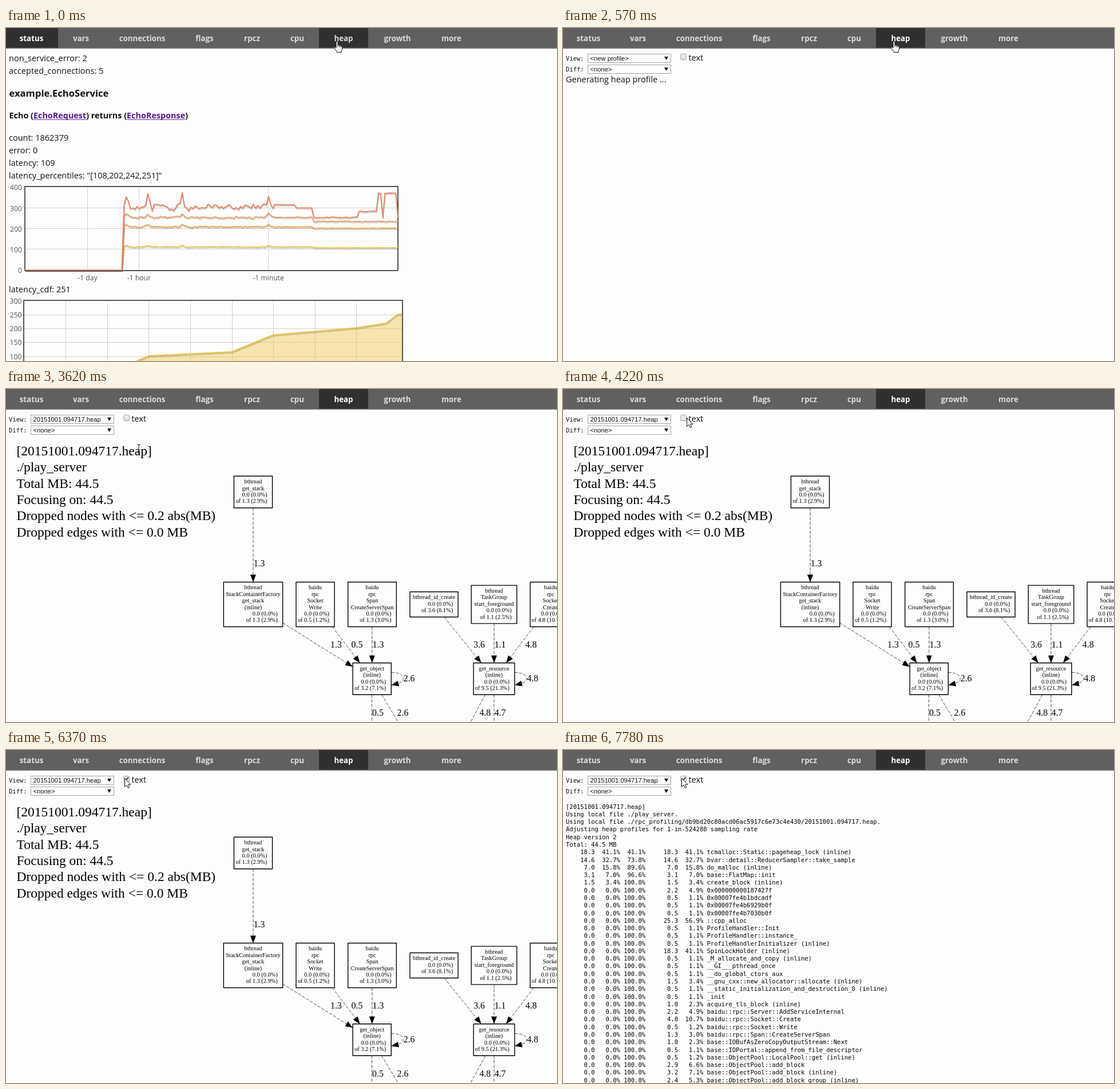
Animation of 963 by 582 pixels, one loop 8 s. Source, as an HTML page with a canvas:

```html
<!DOCTYPE html>
<html lang="en">
<head>
<meta charset="utf-8">
<title>Heap profile walkthrough</title>
<style>
html, body { margin: 0; width: 100%; height: 100%; overflow: hidden; background: #fdfdfd; }
canvas { display: block; }
</style>
</head>
<body>
<canvas id="stage" width="963" height="582"></canvas>
<script>
const W = 963, H = 582, LOOP = 8000;
const ctx = document.getElementById('stage').getContext('2d');

const SANS = '"Open Sans", "Noto Sans", sans-serif';
const FONT = {
  body: `14.5px ${SANS}`,
  nav: `bold 13.3px ${SANS}`,
  title: `bold 16.6px ${SANS}`,
  method: `bold 14.4px ${SANS}`,
  axis: `12.2px ${SANS}`,
  select: '11.2px "Liberation Sans", Arial, sans-serif',
  mono: '10.5px "DejaVu Sans Mono", monospace',
  legend: '23.5px "Liberation Serif", Times, serif',
  node: '10.35px "Liberation Serif", Times, serif',
  edge: '15.8px "Liberation Serif", Times, serif'
};

function text(str, x, y, font, color = '#111', align = 'left') {
  ctx.font = font;
  ctx.fillStyle = color;
  ctx.textAlign = align;
  ctx.fillText(str, x, y);
  return ctx.measureText(str).width;
}

function path(points, dx = 0, dy = 0) {
  ctx.beginPath();
  points.forEach(([x, y], i) => i ? ctx.lineTo(x + dx, y + dy) : ctx.moveTo(x + dx, y + dy));
}

function line(x1, y1, x2, y2, color, width = 1) {
  path([[x1, y1], [x2, y2]]);
  ctx.strokeStyle = color;
  ctx.lineWidth = width;
  ctx.stroke();
}

// Navigation bar

const TABS = [['status', 44.5], ['vars', 131], ['connections', 238], ['flags', 347], ['rpcz', 430],
  ['cpu', 509], ['heap', 590], ['growth', 684], ['more', 778.5]];

function drawNav(active) {
  ctx.fillStyle = '#606060';
  ctx.fillRect(0, 0, W, 35);
  ctx.fillStyle = '#303030';
  if (active === 'status') ctx.fillRect(0, 0, 91, 34.5);
  ctx.fillRect(547, 0, 86, 34.5);
  ctx.fillStyle = '#8e8e8e';
  ctx.fillRect(0, 35, W, 1);
  ctx.fillStyle = '#dadada';
  ctx.fillRect(0, 36, W, 1);
  for (const [name, x] of TABS) {
    text(name, x, 23, FONT.nav, name === active ? '#fff' : '#dcdcdc', 'center');
  }
}

// Status page

const FRAME = '#545454', GRID = '#d2d2d2';
const LAST = 173, FIRST = 46, MINUTE = 113;
const stepX = i => 33 + i * 652 / LAST;

function noise(i, seed) {
  const v = Math.sin(i * 12.99 + seed * 78.23) * 43758.55;
  return v - Math.floor(v) - 0.5;
}

// Each plateau is [first sample, height on stage].
const PLATEAUS = [[FIRST, 314], [117, 309], [126, 314.5], [134, 331], [155, 320.5], [164, 289],
  [166, 331], [167, 289], [LAST, 331]];
const SPIKES = [47, 57, 73, MINUTE];

const lastUpTo = (list, t) => list.filter(entry => entry[0] <= t).pop();
const spike = i => SPIKES.reduce((sum, s) => sum + 23 * Math.max(0, 1 - Math.abs(i - s) / 1.6), 0);
const peakAt = i => lastUpTo(PLATEAUS, i)[1] - spike(i) + noise(i, 5) * (i < 117 ? 13 : i < 134 ? 0 : 1.5);

const lowerLine = (early, late, amp) => i =>
  (i < 134 ? early : late) - spike(i) * amp * 0.32 + noise(i, amp) * amp * (i < 117 ? 4 : 1.5);

const SERIES = [
  ['#edc95c', lowerLine(382.5, 384, 0.3)],
  ['#eda55a', lowerLine(347.5, 350, 0.6)],
  ['#eda066', lowerLine(331, 338, 1)],
  ['#ec8765', peakAt]
];

function strokeSeries(points, color) {
  ctx.lineJoin = 'round';
  ctx.lineWidth = 2;
  path(points, 0.7, 2);
  ctx.strokeStyle = 'rgba(0,0,0,.17)';
  ctx.stroke();
  path(points);
  ctx.strokeStyle = color;
  ctx.stroke();
}

function chartFrame(x, y, w, h) {
  ctx.strokeStyle = FRAME;
  ctx.lineWidth = 2;
  ctx.strokeRect(x, y, w, h);
}

function drawLatency() {
  for (let k = 1; k < 4; k++) line(34, 278.5 + k * 36, 685, 278.5 + k * 36, GRID);
  [['-1 day', 29], ['-1 hour', 53], ['-1 minute', MINUTE]].forEach(([label, i]) => {
    const x = Math.floor(stepX(i)) + 0.5;
    line(x, 278, x, 423, GRID);
    text(label, x, 441, FONT.axis, FRAME, 'center');
  });
  chartFrame(33, 277, 652, 147);
  for (const [color, at] of SERIES) {
    const points = [[33, 423], [stepX(FIRST - 1), 423]];
    for (let i = FIRST; i <= LAST; i++) points.push([stepX(i), at(i)]);
    strokeSeries(points, color);
  }
  for (let v = 0; v <= 400; v += 100) text(v, 28, 428.3 - v * 0.3625, FONT.axis, FRAME, 'right');
}

function drawCdf() {
  const curve = [[177, 603], [250, 573], [395, 566], [467, 536.5], [613, 524], [664, 516], [685, 500.5], [692, 500.5]];
  for (let k = 1; k < 9; k++) {
    const x = Math.floor(32 + k * 72.6) + 0.5;
    line(x, 477, x, H, GRID);
  }
  for (let k = 1; k < 5; k++) {
    const y = Math.floor(477 + k * 24.3) + 0.5;
    line(32, y, 692, y, GRID);
  }
  path([...curve, [692, 640], [177, 640]]);
  ctx.fillStyle = 'rgba(237,194,64,.42)';
  ctx.fill();
  chartFrame(31, 476, 662, 150);
  strokeSeries(curve, '#e9c046');
  for (let k = 0; k < 5; k++) text(300 - k * 50, 27.5, 481.5 + k * 24.3, FONT.axis, FRAME, 'right');
}

function drawMethod() {
  let x = 5.5;
  const parts = ['Echo (', 'EchoRequest', ') returns (', 'EchoResponse', ')'];
  parts.forEach((part, i) => {
    const link = i % 2 === 1;
    const width = text(part, x, 158, FONT.method, link ? '#551a8b' : '#111');
    if (link) line(x, 160, x + width, 160, '#551a8b', 1.2);
    x += width;
  });
}

function textRows(rows, y) {
  rows.forEach((row, i) => text(row, 5, y + i * 22, FONT.body));
}

function drawStatus() {
  textRows(['non_service_error: 2', 'accepted_connections: 5'], 58);
  text('example.EchoService', 5.5, 120, FONT.title);
  drawMethod();
  textRows(['count: 1862379', 'error: 0', 'latency: 109', 'latency_percentiles: "[108,202,242,251]"'], 197);
  drawLatency();
  textRows(['latency_cdf: 251'], 462);
  drawCdf();
}

// Profile controls

function drawSelect(label, value, y) {
  text(label, 5, y + 12, FONT.mono);
  ctx.fillStyle = '#fff';
  ctx.fillRect(43, y, 146, 16);
  ctx.strokeStyle = '#a3a3a3';
  ctx.lineWidth = 1;
  ctx.strokeRect(43.5, y + 0.5, 145, 15);
  text(value, 47.5, y + 11.7, FONT.select);
  path([[177, y + 5], [184, y + 5], [180.5, y + 11]]);
  ctx.fillStyle = '#111';
  ctx.fill();
}

function drawControls(view, checked) {
  drawSelect('View:', view, 45);
  drawSelect('Diff:', '<none>', 64);
  const shade = ctx.createLinearGradient(0, 45, 0, 56);
  shade.addColorStop(0, '#efefef');
  shade.addColorStop(1, '#dcdcdc');
  ctx.beginPath();
  ctx.roundRect(205.5, 45.5, 10, 10, 2);
  ctx.fillStyle = shade;
  ctx.fill();
  ctx.strokeStyle = '#a6a6a6';
  ctx.lineWidth = 1;
  ctx.stroke();
  if (checked) {
    path([[207.5, 50.5], [209.8, 53], [214, 47.5]]);
    ctx.strokeStyle = '#444';
    ctx.lineWidth = 2;
    ctx.stroke();
  }
  text('text', 219.5, 56.5, FONT.body);
}

// Call graph: boxes are sized by their text, edges run between box centres

const ROW_H = 11.35, TIERS = [180, 376.5, 506.5, 626];

function makeNode(x, tier, names, total) {
  const rows = [...names.split('|'), '0.0 (0.0%)', total];
  ctx.font = FONT.node;
  const widest = Math.max(...rows.map(row => ctx.measureText(row).width));
  return { x, y: TIERS[tier], w: widest * 0.9 + 17.5, h: 10 + rows.length * ROW_H, rows };
}

const getStack = makeNode(432, 0, 'bthread|get_stack', 'of 1.3 (2.9%)');
const factory = makeNode(432, 1, 'bthread|StackContainerFactory|get_stack|(inline)', 'of 1.3 (2.9%)');
const write = makeNode(540.5, 1, 'baidu|rpc|Socket|Write', 'of 0.5 (1.2%)');
const span = makeNode(640, 1, 'baidu|rpc|Span|CreateServerSpan', 'of 1.3 (3.0%)');
const idCreate = makeNode(748, 1, 'bthread_id_create', 'of 3.6 (8.1%)');
const taskGroup = makeNode(853, 1, 'bthread|TaskGroup|start_foreground', 'of 1.1 (2.5%)');
const create = makeNode(952, 1, 'baidu|rpc|Socket|Create', 'of 4.8 (10.7%)');
const object = makeNode(639.7, 2, 'get_object|(inline)', 'of 3.2 (7.1%)');
const resource = makeNode(853, 2, 'get_resource|(inline)', 'of 9.5 (21.3%)');
const NODES = [getStack, factory, write, span, idCreate, taskGroup, create, object, resource];

const below = x => makeNode(x, 3, '|', '');
const EDGES = [[getStack, factory, '1.3'], [factory, object, '1.3'], [write, object, '0.5'],
  [span, object, '1.3'], [idCreate, resource, '3.6'], [taskGroup, resource, '1.1'], [create, resource, '4.8'],
  [object, below(639), '0.5'], [object, below(712), '2.6'],
  [resource, below(788), '4.8'], [resource, below(853), '4.7']];

function drawNode({ x, y, w, h, rows }) {
  const top = y - h / 2, right = x + w / 2;
  ctx.strokeStyle = '#000';
  ctx.lineWidth = 1.4;
  ctx.strokeRect(x - w / 2, top, w, h);
  rows.forEach((row, k) => {
    const isName = k < rows.length - 2;
    text(row, isName ? x : right - 9, top + 13 + k * ROW_H, FONT.node, '#000', isName ? 'center' : 'right');
  });
}

function arrowHead(x, y, angle) {
  ctx.save();
  ctx.translate(x, y);
  ctx.rotate(angle);
  path([[0, 0], [-13, -5], [-13, 5]]);
  ctx.fillStyle = '#000';
  ctx.fill();
  ctx.restore();
}

// Where the ray from a box centre along (dx, dy) leaves the box
function border({ x, y, w, h }, dx, dy) {
  const s = Math.min(w / 2 / Math.abs(dx), h / 2 / Math.abs(dy));
  return [x + dx * s, y + dy * s];
}

function drawEdge([from, to, weight]) {
  const dx = to.x - from.x, dy = to.y - from.y;
  const [x1, y1] = border(from, dx, dy), [x2, y2] = border(to, -dx, -dy);
  ctx.setLineDash([5.5, 2.5]);
  line(x1, y1, x2, y2, '#4c4c4c');
  ctx.setLineDash([]);
  arrowHead(x2, y2, Math.atan2(dy, dx));
  const labelY = to.y - to.h / 2 - 32;
  const onLine = from.x + dx * (labelY - from.y) / dy;
  text(weight, onLine + 0.7 + Math.abs(x2 - x1) * 0.18, labelY + 5, FONT.edge, '#000');
}

function drawLoop({ x, y, w }, weight) {
  const right = x + w / 2;
  ctx.setLineDash([5.5, 2.5]);
  ctx.beginPath();
  ctx.moveTo(right, y - 11);
  ctx.bezierCurveTo(right + 13, y - 11, right + 21, y - 7, right + 21, y);
  ctx.quadraticCurveTo(right + 21, y + 5, right + 12, y + 8);
  ctx.strokeStyle = '#4c4c4c';
  ctx.lineWidth = 1;
  ctx.stroke();
  ctx.setLineDash([]);
  arrowHead(right, y + 11, Math.PI - 0.22);
  text(weight, right + 21.5, y + 4.7, FONT.edge, '#000');
}

function drawGraph() {
  const legend = ['[20151001.094717.heap]', './play_server', 'Total MB: 44.5', 'Focusing on: 44.5',
    'Dropped nodes with <= 0.2 abs(MB)', 'Dropped edges with <= 0.0 MB'];
  legend.forEach((row, i) => text(row, 18.5, 116 + i * 28.3, FONT.legend, '#000'));
  EDGES.forEach(drawEdge);
  drawLoop(object, '2.6');
  drawLoop(resource, '4.8');
  NODES.forEach(drawNode);
}

// Text profile

const HEADER = `[20151001.094717.heap]
Using local file ./play_server.
Using local file ./rpc_profiling/db9bd20c80acd06ac5917c6e73c4e430/20151001.094717.heap.
Adjusting heap profiles for 1-in-524288 sampling rate
Heap version 2
Total: 44.5 MB`.split('\n');

const SUMS = ['41.1', '73.8', '89.6', '96.6', '100.0'];
const CALLS = `18.3 41.1 tcmalloc::Static::pageheap_lock (inline)
14.6 32.7 bvar::detail::ReducerSampler::take_sample
7.0 15.8 do_malloc (inline)
3.1 7.0 base::FlatMap::init
1.5 3.4 create_block (inline)
2.2 4.9 0x000000000187427f
0.5 1.1 0x00007fe4b1bdcadf
0.5 1.1 0x00007fe4b6929b0f
0.5 1.1 0x00007fe4b7030b0f
25.3 56.9 ::cpp_alloc
0.5 1.1 ProfileHandler::Init
0.5 1.1 ProfileHandler::instance_
0.5 1.1 ProfileHandlerInitializer (inline)
18.3 41.1 SpinLockHolder (inline)
0.5 1.1 _M_allocate_and_copy (inline)
0.5 1.1 __GI___pthread_once
0.5 1.1 __do_global_ctors_aux
1.5 3.4 __gnu_cxx::new_allocator::allocate (inline)
0.5 1.1 __static_initialization_and_destruction_0 (inline)
0.5 1.1 _init
1.0 2.3 acquire_tls_block (inline)
2.2 4.9 baidu::rpc::Server::AddServiceInternal
4.8 10.7 baidu::rpc::Socket::Create
0.5 1.2 baidu::rpc::Socket::Write
1.3 3.0 baidu::rpc::Span::CreateServerSpan
1.0 2.3 base::IOBufAsZeroCopyOutputStream::Next
0.5 1.1 base::IOPortal::append_from_file_descriptor
0.5 1.2 base::ObjectPool::LocalPool::get (inline)
2.9 6.6 base::ObjectPool::add_block
3.2 7.1 base::ObjectPool::add_block (inline)
2.4 5.3 base::ObjectPool::add_block_group (inline)`.split('\n');

function formatCall(row, i) {
  const [cum, share, ...name] = row.split(' ');
  const own = i < SUMS.length;
  const percent = v => (v + '%').padStart(6);
  return [(own ? cum : '0.0').padStart(8), percent(own ? share : '0.0'), percent(own ? SUMS[i] : '100.0'),
    cum.padStart(8), percent(share), ...name].join(' ');
}

const REPORT = [...HEADER, ...CALLS.map(formatCall)];

function drawReport() {
  REPORT.forEach((row, i) => text(row, 5, Math.round(102.6 + i * 13.28), FONT.mono, '#000'));
}

// Pointer: moves in hard steps along eased legs

const LEGS = [
  { from: 3020, every: 120, steps: 6, x: 232, y: 104 },
  { from: 3770, every: 150, steps: 4, x: 216, y: 50 },
  { from: 5840, every: 120, steps: 2, x: 207, y: 49 }
];

const SHAPES = {
  arrow: new Path2D('M.5 .5V15.5L4 12.2 6.3 17.5 8.8 16.4 6.5 11.3H11Z'),
  hand: new Path2D('M-1 1Q-1 -1 .5 -1T2 1V6Q4 5 5 6.7 6.6 6 7.6 7.5 9.7 7 9.7 9.5V13L8 16V18.5H0V16.5L-4 11.5Q-5.2 9 -3.3 9L-1 11Z'),
  beam: new Path2D('M-3 -7H-1L0 -6 1 -7H3M0 -6V6M-3 7H-1L0 6 1 7H3')
};

function pointerAt(t) {
  let x = 578, y = 24;
  for (const leg of LEGS) {
    const step = Math.floor((t - leg.from) / leg.every) + 1;
    const s = Math.min(1, Math.max(0, step / leg.steps));
    const ease = s * s * (3 - 2 * s);
    x += (leg.x - x) * ease;
    y += (leg.y - y) * ease;
  }
  const kind = t < LEGS[0].from ? 'hand' : y > 95 && x < 255 ? 'beam' : 'arrow';
  return { x: Math.round(x), y: Math.round(y), kind };
}

function drawPointer(t) {
  const { x, y, kind } = pointerAt(t);
  ctx.save();
  ctx.translate(x, y);
  ctx.lineWidth = 1;
  ctx.strokeStyle = '#111';
  ctx.fillStyle = '#fff';
  if (kind !== 'beam') ctx.fill(SHAPES[kind]);
  ctx.stroke(SHAPES[kind]);
  if (kind === 'hand') ctx.stroke(new Path2D('M2 6V9M5 7V10M7.5 8V10'));
  ctx.restore();
}

// Timeline

const SCENES = [
  [0, drawStatus],
  [570, drawWaiting],
  [2370, drawGraph],
  [6620, drawWaiting],
  [7780, drawReport]
];

function drawWaiting() {
  text('Generating heap profile ...', 5, 95, FONT.body);
}

function render(t) {
  ctx.fillStyle = '#fdfdfd';
  ctx.fillRect(0, 0, W, H);
  const onStatus = t < 570;
  if (!onStatus) drawControls(t < 2370 ? '<new profile>' : '20151001.094717.heap', t >= 6370);
  lastUpTo(SCENES, t)[1]();
  drawNav(onStatus ? 'status' : 'heap');
  drawPointer(t);
}

const start = performance.now();
function tick() {
  render((performance.now() - start) % LOOP);
  requestAnimationFrame(tick);
}
tick();
</script>
</body>
</html>
```
